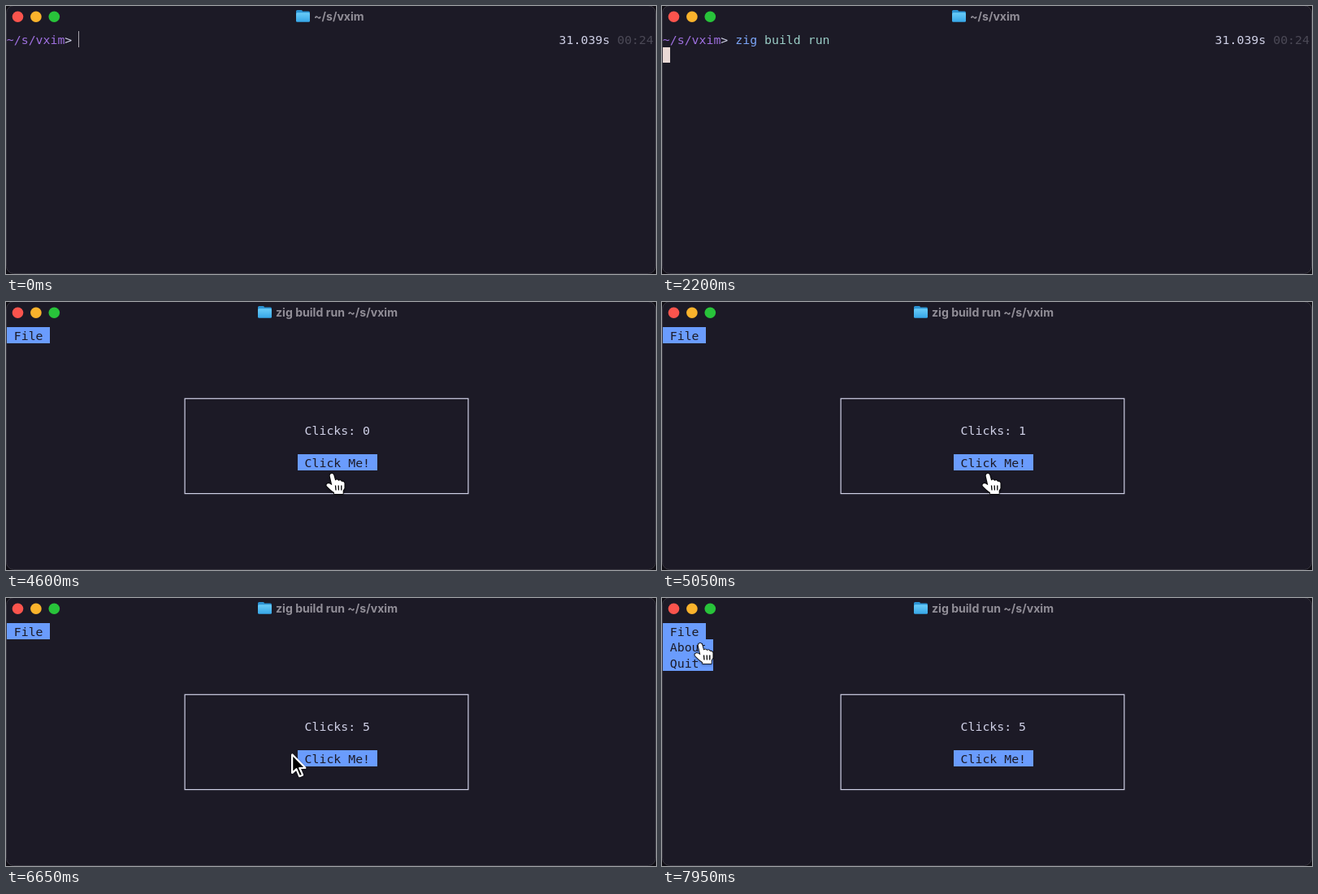
An HTML page with a canvas for the animation above (8 s loop, 800 by 331 pixels).

```html
<!DOCTYPE html>
<html lang="en">
<head>
<meta charset="utf-8">
<title>Terminal button demo</title>
<style>
html, body { margin: 0; width: 100%; height: 100%; overflow: hidden; background: #0f0d14; }
canvas { display: block; width: 800px; height: 331px; }
</style>
</head>
<body>
<canvas id="stage"></canvas>
<script>
const W = 800, H = 331, LOOP = 8000;
const CELL_W = 8.945, CELL_H = 19.6, LEFT = 0.8, TOP = 31.2;
const MONO = '14.86px "DejaVu Sans Mono", monospace';
const SANS = 'bold 14.1px Inter, sans-serif';
const COLOR = {
  bg: '#1c1a26', text: '#cfd0e6', dim: '#4b4956', path: '#9f70e0',
  command: '#7ba5f7', args: '#9acdc6', button: '#6a9cfd', title: '#918e97'
};

const APP_START = 2300, ENTER = 2050, MENU_OPEN = 7550;
const COMMAND = 'zig build run';
const KEY_TIMES = [300, 400, 500, 700, 850, 960, 1080, 1220, 1360, 1480, 1660, 1750, 1840];
const CLICKS = [4650, 5100, 5500, 5850, 6200];

// Pointer stops: time, x, y, easing towards the next stop
const ease = u => u * u * (3 - 2 * u);
const linear = u => u;
const hold = () => 0;
const POINTER = [
  [3450, 405, 313, hold], [3500, 403, 304, hold],
  [3750, 392, 285, ease], [4300, 401, 212, hold],
  [6450, 401, 212, linear], [6650, 352, 192, linear],
  [7000, 126, 89, hold], [7200, 126, 89, ease],
  [7450, 34, 43, hold], [7650, 34, 43, ease],
  [7900, 47, 56, hold], [LOOP, 47, 56, hold]
];

const canvas = document.getElementById('stage');
const ctx = canvas.getContext('2d');
const ratio = window.devicePixelRatio || 1;
canvas.width = W * ratio;
canvas.height = H * ratio;

const colX = col => LEFT + col * CELL_W;
const rowY = row => TOP + row * CELL_H;

function rect(x, y, w, h, color) {
  ctx.fillStyle = color;
  ctx.fillRect(x, y, w, h);
}

function cells(col, row, count, color) {
  const x = Math.round(colX(col)), y = Math.round(rowY(row));
  rect(x, y, Math.round(colX(col + count)) - x, Math.round(rowY(row + 1)) - y, color);
}

function text(str, col, row, color) {
  ctx.font = MONO;
  ctx.fillStyle = color;
  ctx.fillText(str, colX(col), rowY(row) + 15.6);
}

function label(str, col, row) {
  cells(col, row, str.length, COLOR.button);
  text(str, col, row, COLOR.bg);
}

function folder(x) {
  ctx.fillStyle = '#2b93d3';
  ctx.beginPath();
  ctx.roundRect(x, 5, 8, 6, 1.5);
  ctx.roundRect(x, 6.5, 17, 7, 1.5);
  ctx.fill();
  const front = ctx.createLinearGradient(0, 8, 0, 20);
  front.addColorStop(0, '#6bcdf8');
  front.addColorStop(1, '#35a5e6');
  ctx.fillStyle = front;
  ctx.beginPath();
  ctx.roundRect(x, 8.3, 17, 11.5, 1.5);
  ctx.fill();
}

function frameWindow(title, titleX) {
  rect(0, 0, W, H, '#0f0d14');
  ctx.beginPath();
  ctx.roundRect(0.5, -0.5, W - 1, H, 9);
  ctx.fillStyle = COLOR.bg;
  ctx.fill();
  ctx.strokeStyle = '#37353f';
  ctx.lineWidth = 1;
  ctx.stroke();
  ['#fb544d', '#fab32c', '#28c33a'].forEach((color, i) => {
    ctx.fillStyle = color;
    ctx.beginPath();
    ctx.arc(14.5 + i * 22.4, 13.2, 6.8, 0, Math.PI * 2);
    ctx.fill();
  });
  folder(titleX - 22);
  ctx.font = SANS;
  ctx.fillStyle = COLOR.title;
  ctx.fillText(title, titleX, 17.6);
}

function drawShell(t) {
  text('~/s/vxim', 0, 0, COLOR.path);
  text('>', 8, 0, COLOR.text);
  const typed = KEY_TIMES.filter(k => k <= t).length;
  text(COMMAND.slice(0, Math.min(typed, 3)), 10, 0, COLOR.command);
  text(COMMAND.slice(3, Math.max(typed, 3)), 13, 0, COLOR.args);
  text('31.039s', 76, 0, COLOR.text);
  text('00:24', 84, 0, COLOR.dim);
  if (t < ENTER) rect(Math.round(colX(10 + typed)) - 1, 31, 1, 20, '#a9a5ad');
  else cells(0, 1, 1, '#ead9d6');
}

function drawApp(t) {
  label(' File ', 0, 0);
  ctx.strokeStyle = COLOR.text;
  ctx.lineWidth = 1.2;
  ctx.strokeRect(220.1, 119.3, 348.8, 117.3);
  text('Clicks: ' + CLICKS.filter(c => c <= t).length, 41, 6, COLOR.text);
  label(' Click Me! ', 40, 8);
  if (t >= MENU_OPEN) {
    label(' About ', 0, 1);
    label(' Quit  ', 0, 2);
  }
}

function pointerAt(t) {
  const i = POINTER.findIndex(p => p[0] > t) - 1;
  if (i < 0) return null;
  const [t0, x0, y0, curve] = POINTER[i], [t1, x1, y1] = POINTER[i + 1];
  const u = curve((t - t0) / (t1 - t0));
  return { x: x0 + (x1 - x0) * u, y: y0 + (y1 - y0) * u };
}

const ARROW = new Path2D('M1 2V24L6.2 19.3L10 28.3L13.5 26.8L9.7 18.1H16.8Z');
const HAND = new Path2D('M-2.3 3C-2.8 -.4 1.4 -.9 2.3 1.8L4.2 8.4C5.5 6.8 7.8 7.4 8.2 8.9' +
  'C9.8 7.6 11.6 8.4 12 9.9C13.8 9.2 15.3 10.2 15.5 12V18L13.7 21V25H3V23.3' +
  'C-.5 21 -2.8 18.5 -6 15.5C-7.6 13.3 -4.8 11.2 -2.6 12.6L.3 14.2Z');
const KNUCKLES = new Path2D('M4.5 14.5L5 20.5M8.2 14.5L8.4 20.5M11.8 14.5V20.5');

function overTarget({ x, y }, t) {
  const onButton = x > 359 && x < 457 && y > 188 && y < 214;
  const onMenu = x < 55 && y > 31 && y < 51;
  const onItem = t >= MENU_OPEN && x < 64 && y < 90;
  return onButton || onMenu || onItem;
}

function drawPointer(t) {
  const pos = pointerAt(t);
  if (!pos) return;
  const hand = overTarget(pos, t);
  const shape = hand ? HAND : ARROW;
  ctx.save();
  ctx.translate(pos.x, pos.y);
  ctx.lineJoin = 'round';
  ctx.lineWidth = hand ? 1.6 : 2.6;
  ctx.fillStyle = hand ? '#fff' : '#000';
  ctx.strokeStyle = hand ? '#000' : '#fff';
  ctx.save();
  ctx.shadowColor = 'rgba(0,0,0,.45)';
  ctx.shadowBlur = 3;
  ctx.shadowOffsetY = 1;
  ctx.stroke(shape);
  ctx.restore();
  ctx.fill(shape);
  if (hand) {
    ctx.lineWidth = 1.3;
    ctx.stroke(KNUCKLES);
  } else {
    ctx.lineWidth = 1.8;
    ctx.stroke(shape);
  }
  ctx.restore();
}

function draw(t) {
  ctx.setTransform(ratio, 0, 0, ratio, 0, 0);
  if (t < APP_START) {
    frameWindow('~/s/vxim', 379);
    drawShell(t);
  } else {
    frameWindow('zig build run ~/s/vxim', 332);
    drawApp(t);
  }
  drawPointer(t);
}

const start = performance.now();
function tick() {
  draw((performance.now() - start) % LOOP);
  requestAnimationFrame(tick);
}
tick();
</script>
</body>
</html>
```
